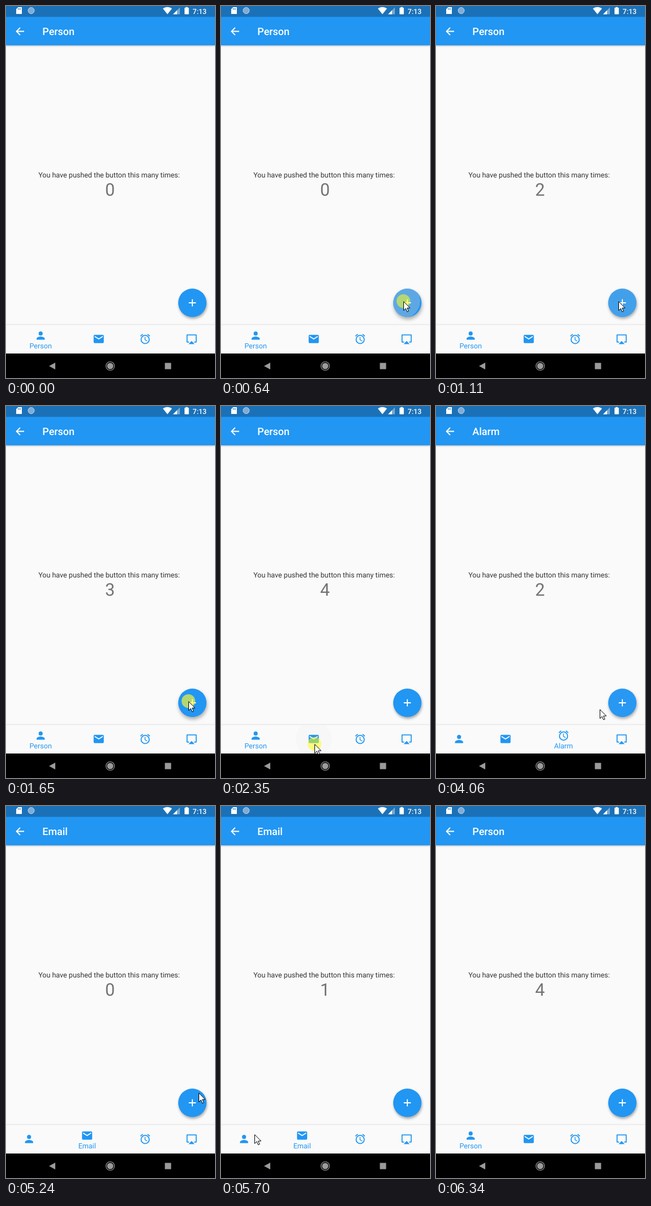
An HTML page that plays this animation: 369 px wide and 653 px high, repeating every 7.2 s.

```html
<!DOCTYPE html>
<html lang="en">
<head>
<meta charset="utf-8">
<title>Tab counters</title>
<style>
  html, body { margin: 0; width: 100%; height: 100%; overflow: hidden; background: #fafafa; }
  svg { display: block; width: 100%; height: 100%; }
  text { font-family: Roboto, sans-serif; text-rendering: geometricPrecision; }
  .mid { text-anchor: middle; }
  .line { fill: none; stroke: #2196f3; stroke-width: 2; }
  .top { filter: drop-shadow(0 1.5px 1.8px rgba(0, 0, 0, .3)); }
  .bottom { filter: drop-shadow(0 -.5px 1px rgba(0, 0, 0, .1)); }
</style>
</head>
<body>
<svg viewBox="0 0 369 653" xmlns="http://www.w3.org/2000/svg">
  <defs>
    <clipPath id="tabClip"><rect y="560" width="369" height="50"/></clipPath>
    <clipPath id="fabClip"><circle cx="329" cy="521" r="25"/></clipPath>
    <g id="icon0">
      <circle cx="12" cy="8" r="4"/>
      <path d="M12 14c-2.67 0-8 1.34-8 4v2h16v-2c0-2.66-5.33-4-8-4z"/>
    </g>
    <g id="icon1">
      <rect x="2" y="4" width="20" height="16" rx="2"/>
      <path d="M4 7l8 5 8-5" fill="none" stroke="#fafafa" stroke-width="2"/>
    </g>
    <g id="icon2" class="line">
      <circle cx="12" cy="13" r="8"/>
      <path d="M21.3 6.5l-4.6-3.9M2.7 6.5l4.6-3.9"/>
      <path d="M11.75 8v5.6l4.4 2.6" stroke-width="1.5"/>
    </g>
    <g id="icon3">
      <path class="line" d="M7 18H3V4h18v14h-4" stroke-linejoin="round"/>
      <path d="M6 22h12l-6-6z"/>
    </g>
  </defs>

  <rect width="369" height="653" fill="#fafafa"/>

  <rect class="top" width="369" height="69" fill="#2196f3"/>
  <rect width="369" height="19" fill="#1b71b8"/>
  <g fill="#fff">
    <path d="M21.5 2H28v12H18V5.5z"/>
    <path d="M21.5 4v2.5M23.5 4v2.5M25.5 4v2.5" stroke="#1b71b8"/>
    <circle cx="44.5" cy="8" r="5.5" fill="#7fadd6" stroke="#b9d3ea"/>
    <path d="M285 14.5L277 4.6a12.5 12.5 0 0 1 16 0z"/>
    <path d="M295 14.5h12v-12z" opacity=".4"/>
    <path d="M295 14.5h7v-7z"/>
    <rect x="315.2" y="3" width="7.6" height="11.5" rx=".8"/>
    <rect x="317.2" y="1.8" width="3.6" height="2"/>
    <text x="329.6" y="13.5" font-size="12.5" font-weight="500">7:13</text>
    <path d="M32 44.500H19M25 38l-6.500 6.500l6.500 6.500" fill="none" stroke="#fff" stroke-width="1.800"/>
    <text id="title" x="64.3" y="51" font-size="17.94" font-weight="500"></text>
  </g>

  <text class="mid" x="182" y="301" font-size="12.56" fill="#333">You have pushed the button this many times:</text>
  <text id="count" class="mid" x="183.5" y="333" font-size="30.5" fill="#737373"></text>

  <circle id="fab" cx="329" cy="521" r="25" fill="#2196f3"/>
  <g clip-path="url(#fabClip)"><circle id="splash" fill="#c8c8c8"/></g>
  <path d="M322.7 521h12.6M329 514.7v12.6" stroke="#fff" stroke-width="1.8"/>

  <rect class="bottom" y="560" width="369" height="51" fill="#fafafa"/>
  <g clip-path="url(#tabClip)"><circle id="ripple" cy="585"/></g>
  <g id="tabs" fill="#2196f3"></g>

  <rect y="610" width="369" height="43"/>
  <g fill="#9b9b9b">
    <path d="M76 632l11-6v12z"/>
    <circle cx="184" cy="632" r="5.5"/>
    <circle cx="184" cy="632" r="7.5" fill="none" stroke="#9b9b9b" stroke-width="1.2"/>
    <rect x="280.5" y="626.5" width="11" height="11"/>
  </g>

  <g id="pointer">
    <circle id="glow" r="12" fill="#ffff10" opacity=".54"/>
    <path d="M.5 .8V16.5L4.200 13L6.700 18.800L9.200 17.700L6.700 12.100H11.700z" fill="#fff" stroke="#000"/>
  </g>
</svg>

<script>
const LOOP = 7200;
const NAMES = ['Person', 'Email', 'Alarm', ''];
const FAB = -1;
const REACT = 90; // delay from a press to its effect

// Where the pointer rests, what it presses there and when
const STOPS = [
  { x: 298, y: 608, from: 70, to: 70, taps: [] },
  { x: 322, y: 518, from: 400, to: 1725, on: FAB, taps: [565, 880, 1325, 1635] },
  { x: 165, y: 593, from: 2200, to: 2430, on: 1, taps: [2275] },
  { x: 245, y: 592, from: 2800, to: 2975, on: 2, taps: [2885] },
  { x: 320, y: 521, from: 3288, to: 3935, on: FAB, taps: [3585, 3745] },
  { x: 124, y: 588, from: 4445, to: 4525, on: 1, taps: [4445] },
  { x: 340, y: 503, from: 5010, to: 5390, on: FAB, taps: [5315] },
  { x: 43, y: 580, from: 5750, to: 6025, on: 0, taps: [5945] },
  { x: 60, y: 608, from: 6262, to: 6300, taps: [] }
];
const TAPS = STOPS.flatMap(s => s.taps.map(time => ({ time, on: s.on })));

// The screen refreshes only in these spans, about every 75 ms
const BURSTS = [
  [70, 400], [570, 1270], [1330, 2050], [2200, 2890], [2980, 3440],
  [3590, 4300], [4370, 5010], [5240, 5700], [5950, 6340]
];

const $ = id => document.getElementById(id);
const clamp = v => Math.max(0, Math.min(1, v));
const smooth = v => v * v * (3 - 2 * v);
const mix = (a, b, k) => a + (b - a) * k;

function set(el, attrs) {
  for (const key in attrs) el.setAttribute(key, attrs[key]);
}

function add(parent, tag, attrs) {
  const el = document.createElementNS('http://www.w3.org/2000/svg', tag);
  set(el, attrs);
  return parent.appendChild(el);
}

const tabs = NAMES.map((name, i) => {
  const icon = add($('tabs'), 'use', { href: '#icon' + i });
  const label = add($('tabs'), 'text', { class: 'mid', y: 601, 'font-size': 12.56 });
  label.textContent = name;
  return { icon, label };
});

function screenTime(t) {
  const burst = BURSTS.filter(b => b[0] <= t).pop();
  if (!burst) return 0;
  const [start, end] = burst;
  const steps = Math.ceil((end - start) / 80);
  const step = (end - start) / steps;
  return start + step * Math.min(steps, Math.floor((t - start) / step + .15));
}

function pointerAt(t) {
  const i = STOPS.findIndex(s => s.to >= t);
  const b = STOPS[i < 0 ? STOPS.length - 1 : i];
  const a = STOPS[i - 1] || b;
  const k = a === b ? 1 : smooth(clamp((t - a.to) / (b.from - a.to)));
  return [mix(a.x, b.x, k), mix(a.y, b.y, k)].map(Math.round);
}

// Replays the presses: every tab keeps its own counter
function stateAt(t) {
  const state = { page: 0, before: 0, since: -LOOP, counts: NAMES.map(() => 0) };
  for (const { time, on } of TAPS) {
    if (time + REACT > t) break;
    if (on === FAB) state.counts[state.page]++;
    else Object.assign(state, { page: on, before: state.page, since: time + REACT });
  }
  return state;
}

// The chosen tab is half as wide again as the others
function layout({ page, before, since }, t) {
  const k = smooth(clamp((t - since) / 200));
  let left = 0;
  return NAMES.map((_, i) => {
    const chosen = mix(+(i === before), +(i === page), k);
    const width = 82 * (1 + chosen / 2);
    left += width;
    return { chosen, x: left - width / 2 - .3 };
  });
}

function drawTabs(places) {
  tabs.forEach(({ icon, label }, i) => {
    const { x, chosen } = places[i];
    const y = 584.5 - 6 * chosen;
    set(icon, { transform: `translate(${x - 10.76} ${y - 10.76}) scale(.897)` });
    set(label, { x, opacity: chosen });
  });
}

function drawPress(t, x, y, places) {
  const tap = TAPS.filter(p => p.time <= t).pop() || { time: -LOOP, on: FAB };
  const dt = t - tap.time;
  const fade = 1 - clamp((dt - 150) / 190);
  const grow = clamp(dt / 250);
  const lift = tap.on === FAB ? fade : 0;

  set($('splash'), { cx: x, cy: y, r: 8 + 65 * grow, opacity: .36 * lift });
  $('fab').style.filter = `drop-shadow(${1.5}px ${3 + lift}px ${2.3 + lift}px rgba(0,0,0,.32))`;
  if (tap.on !== FAB) set($('ripple'), { cx: places[tap.on].x });
  set($('ripple'), { r: 18 + 45 * grow, opacity: .012 * (fade - lift) });
  set($('glow'), { visibility: dt < 150 ? 'inherit' : 'hidden' });
}

function draw(now) {
  const t = screenTime(now % LOOP);
  const [x, y] = pointerAt(t);
  const state = stateAt(t);
  const places = layout(state, t);
  drawTabs(places);
  drawPress(t, x, y, places);
  $('title').textContent = NAMES[state.page];
  $('count').textContent = state.counts[state.page];
  set($('pointer'), {
    transform: `translate(${x} ${y})`,
    visibility: t >= 70 && t < 6300 ? 'visible' : 'hidden'
  });
}

const origin = performance.now();
function tick() {
  draw(performance.now() - origin);
  requestAnimationFrame(tick);
}
tick();
</script>
</body>
</html>
```
